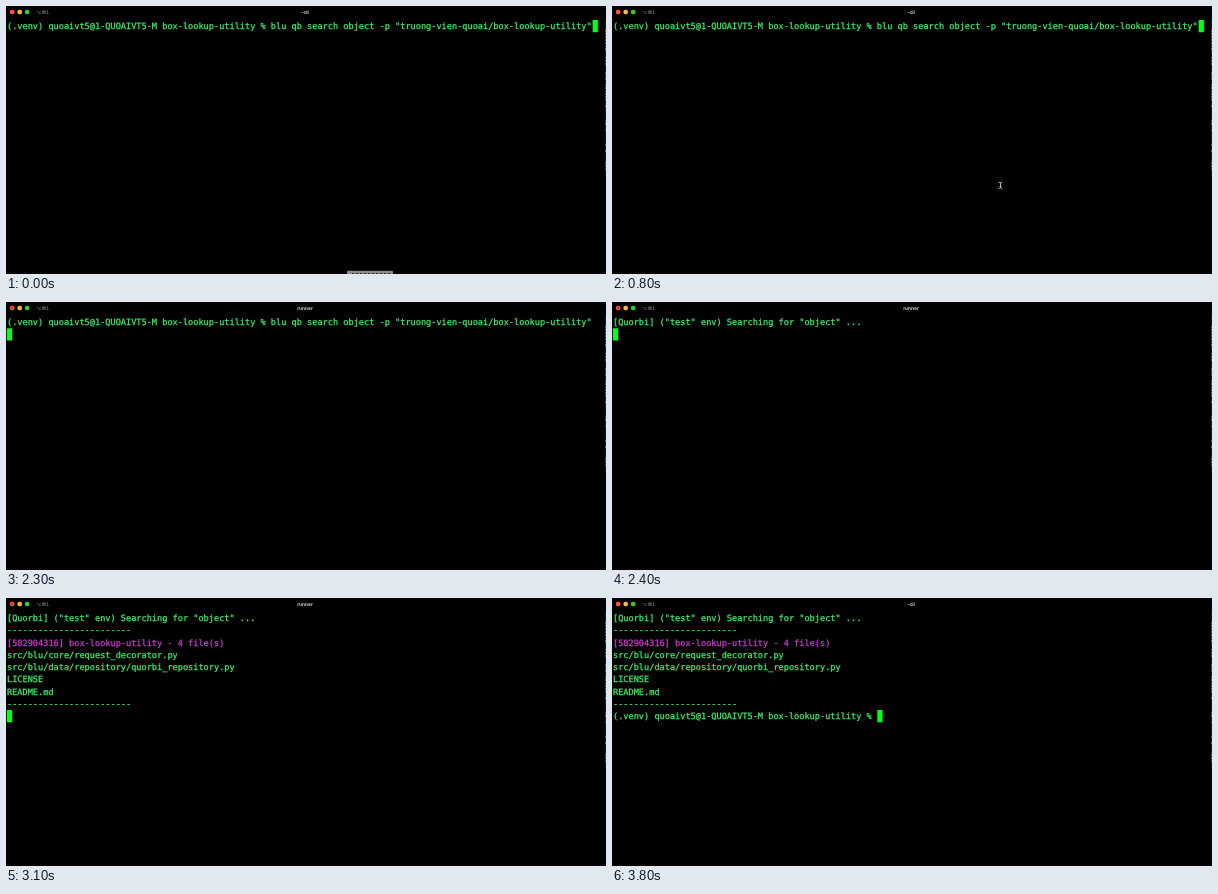
An HTML page with a canvas for the animation above (4000 ms loop, 600 by 268 pixels).

```html
<!DOCTYPE html>
<html lang="en">
<head>
<meta charset="utf-8">
<title>Terminal</title>
<style>
  html, body { margin: 0; width: 100%; height: 100%; overflow: hidden; background: #000; }
  canvas { display: block; width: 600px; height: 268px; }
</style>
</head>
<body>
<canvas id="stage"></canvas>
<script>
const W = 600, H = 268, LOOP = 4000, STEP = 100;
const FONT_SIZE = 8.61, CELL = FONT_SIZE * 0.602, ROW = 12.25;
const LEFT = 1, TOP = 14;
const GREEN = '#33f566', MAGENTA = '#d436d4', CURSOR = '#00ff1c';

const PROMPT = '(.venv) quoaivt5@1-QUOAIVT5-M box-lookup-utility % ';
const COMMAND = 'blu qb search object -p "truong-vien-quoai/box-lookup-utility"';
const SEARCHING = '[Quorbi] ("test" env) Searching for "object" ...';
const RULE = '-'.repeat(24);
const RESULTS = [
  SEARCHING,
  RULE,
  '[582904316] box-lookup-utility - 4 file(s)',
  'src/blu/core/request_decorator.py',
  'src/blu/data/repository/quorbi_repository.py',
  'LICENSE',
  'README.md',
  RULE
];

// Terminal contents; the block cursor follows the last line.
const SCREENS = [
  { at: 0, lines: [PROMPT + COMMAND] },
  { at: 1600, lines: [PROMPT + COMMAND, ''] },
  { at: 2400, lines: [SEARCHING, ''] },
  { at: 3100, lines: [...RESULTS, ''] },
  { at: 3200, lines: [...RESULTS, PROMPT] }
];

const canvas = document.getElementById('stage');
const ctx = canvas.getContext('2d');
const dpr = window.devicePixelRatio || 1;
canvas.width = W * dpr;
canvas.height = H * dpr;

function rect(x, y, w, h, color) {
  ctx.fillStyle = color;
  ctx.fillRect(x, y, w, h);
}

function disc(x, y, r, color) {
  ctx.fillStyle = color;
  ctx.beginPath();
  ctx.arc(x, y, r, 0, Math.PI * 2);
  ctx.fill();
}

// A hairline stroke gives the small type a little more weight.
function text(str, x, y, font, color, align = 'left', weight = 0.25) {
  ctx.font = font;
  ctx.textAlign = align;
  ctx.fillStyle = ctx.strokeStyle = color;
  ctx.lineWidth = weight;
  ctx.fillText(str, x, y);
  ctx.strokeText(str, x, y);
}

function drawTitleBar(running) {
  disc(6.2, 6.1, 2.4, '#ff5149');
  disc(13.7, 6.1, 2.4, '#f7bb2f');
  disc(21.2, 6.1, 2.4, '#2bc840');
  if (running) disc(6.2, 6.1, 0.8, '#7a1510');
  text('⌥⌘1', 30, 7.7, '4.7px "DejaVu Sans", sans-serif', '#808080', 'left', 0.1);
  text(running ? 'runner' : '-cli', 299, 7.7, 'bold 4.8px Inter, sans-serif', '#b4b4b4', 'center', 0.1);
}

// Sliver of another window along the right edge.
function drawEdge() {
  rect(599, 13, 1, 158, '#181818');
  let seed = 11;
  for (let y = 21; y < 171; y += 3) {
    seed = (seed * 73 + 41) % 256;
    if (seed > 120) rect(599, y, 1, 2, `rgba(150,150,150,${seed / 400})`);
  }
}

function drawTerminal(t) {
  const { lines } = SCREENS.filter(s => s.at <= t).pop();
  const font = `${FONT_SIZE}px "DejaVu Sans Mono", monospace`;
  lines.forEach((line, i) => {
    const color = line.includes('file(s)') ? MAGENTA : GREEN;
    text(line, LEFT, TOP + i * ROW + 9, font, color);
  });
  const row = lines.length - 1;
  rect(LEFT + lines[row].length * CELL, TOP + row * ROW, CELL, ROW, CURSOR);
}

function drawTooltip(t) {
  if (t >= 500) return;
  ctx.globalAlpha = t < 400 ? 1 : 0.5;
  ctx.fillStyle = '#8c8c8c';
  ctx.beginPath();
  ctx.roundRect(341, 264.8, 46, 6, 1.2);
  ctx.fill();
  for (let x = 346; x < 383; x += 4) rect(x, 267, 2.4, 1, '#333');
  ctx.globalAlpha = 1;
}

function drawPointer(t) {
  if (t < 400 || t >= 1600) return;
  const p = Math.min(1, (t - 300) / 500);
  const ease = 1 - (1 - p) ** 2;
  const x = 364 + 24.5 * ease, y = 268 - 88.7 * ease;
  ctx.strokeStyle = '#c4c4c4';
  ctx.lineWidth = 0.9;
  ctx.beginPath();
  ctx.moveTo(x, y - 2.6);
  ctx.lineTo(x, y + 2.6);
  for (const s of [-1, 1]) {
    ctx.moveTo(x - 1.8, y + 3.1 * s);
    ctx.quadraticCurveTo(x, y + 3.1 * s, x, y + 2.2 * s);
    ctx.quadraticCurveTo(x, y + 3.1 * s, x + 1.8, y + 3.1 * s);
  }
  ctx.moveTo(x - 1, y + 1);
  ctx.lineTo(x + 1, y + 1);
  ctx.stroke();
}

function draw(now) {
  const t = Math.floor((now % LOOP) / STEP) * STEP;
  ctx.setTransform(dpr, 0, 0, dpr, 0, 0);
  ctx.textRendering = 'geometricPrecision';
  ctx.lineJoin = 'round';
  rect(0, 0, W, H, '#000');
  drawTitleBar(t >= 2300 && t < 3600);
  drawEdge();
  drawTerminal(t);
  drawTooltip(t);
  drawPointer(t);
}

const start = performance.now();
function tick() {
  draw(performance.now() - start);
  requestAnimationFrame(tick);
}
tick();
</script>
</body>
</html>
```
